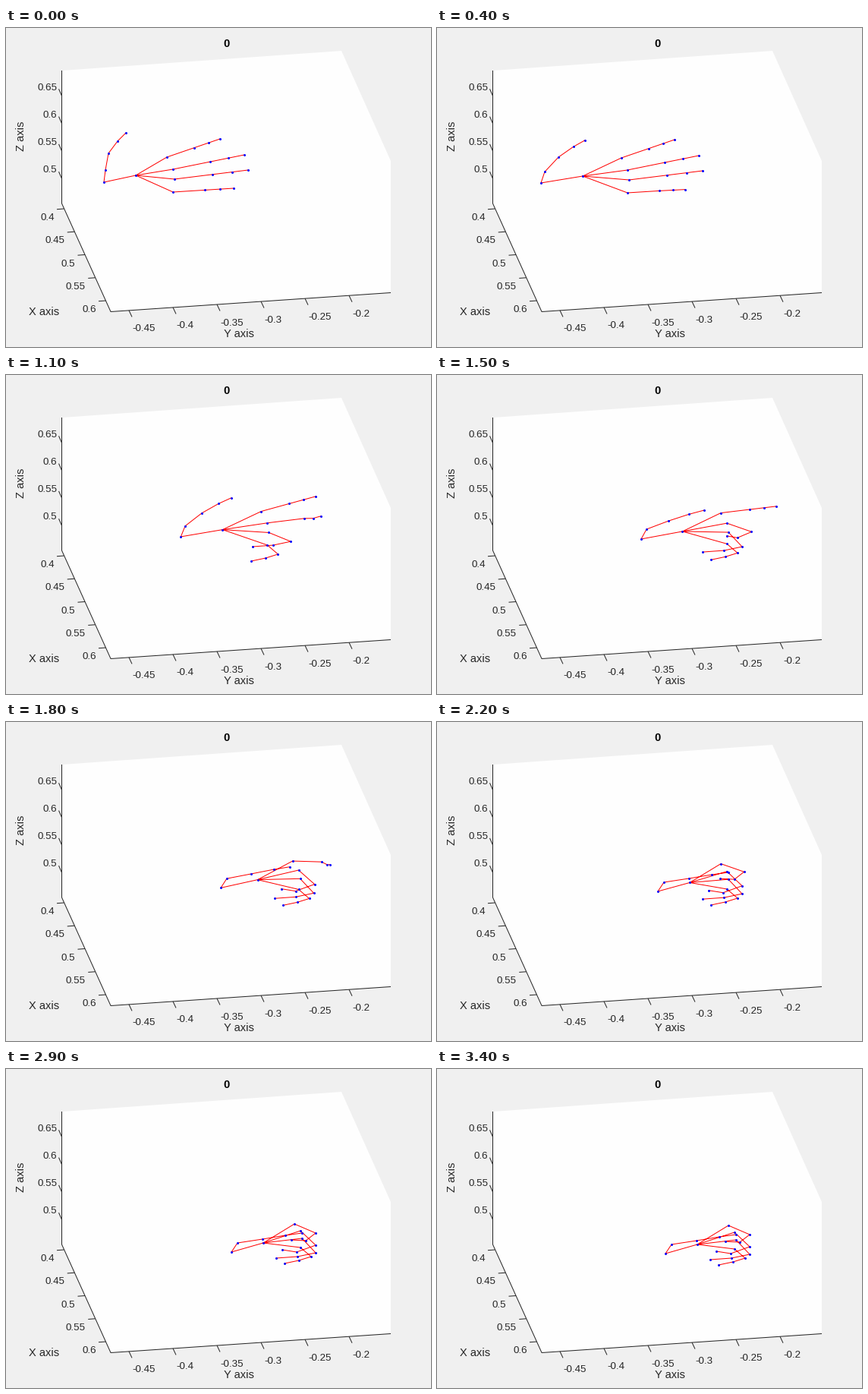
A matplotlib script for the animation above (3500 ms loop, 560 px wide and 420 px high).

```python
import numpy as np
import matplotlib.pyplot as plt
from matplotlib.animation import FuncAnimation

W, H, DPI = 560, 420, 100
FRAMES, STEP = 35, 100
PX = 72 / DPI
INK = "#262626"

plt.rcParams["font.family"] = "Liberation Sans"

# Points are complex numbers, x + y*1j, in pixels with y pointing down.
TIMES = np.array([0, 400, 800, 1500, 2200, 2900, 3400])
WRIST = np.array([129 + 203j, 137 + 204j, 193 + 210j, 269 + 216j,
                  291 + 223j, 297 + 241j, 301 + 243j])
SPEED = np.gradient(WRIST, TIMES)

THUMB_OPEN = np.array([2 - 16j, 6 - 38j, 18 - 54j, 29 - 65j])
THUMB_SHUT = np.array([8 - 12j, 41 - 17j, 71 - 22j, 93 - 25j])

# Knuckle from the wrist, its shift while open, straight reach,
# folded bones, curl start and end in ms.
FINGERS = [
    (83 - 37j, 4j, 70 - 24j, (28 + 12j, -13 + 10j, -19 - 1j), 1500, 2250),
    (91 - 28j, 11j, 94 - 19j, (20 + 19j, -25 + 9j, -19 - 3j), 800, 1700),
    (93 - 18j, 14j, 97 - 12j, (18 + 19j, -24 + 5j, -28 + 2j), 500, 1150),
    (91 - 6j, 19j, 80 - 5j, (14 + 12j, -16 + 5j, -19 + 4j), 330, 830),
]
BONES = np.array([0.52, 0.26, 0.22])   # share of the reach per bone
LAG = np.array([200, 0, 0])            # the first bone folds last


def ease(t, start, end):
    s = np.clip((t - start) / (end - start), 0, 1)
    return s * s * (3 - 2 * s)


def wrist_at(t):
    """Cubic path through the wrist's key points."""
    i = min(np.searchsorted(TIMES, t, side="right") - 1, len(TIMES) - 2)
    h = TIMES[i + 1] - TIMES[i]
    s = (t - TIMES[i]) / h
    return (WRIST[i] * (1 + 2 * s) * (1 - s) ** 2
            + SPEED[i] * h * s * (1 - s) ** 2
            + WRIST[i + 1] * s * s * (3 - 2 * s)
            + SPEED[i + 1] * h * s * s * (s - 1))


def pose(t):
    """Wrist, palm, thumb joints and the joints of each finger."""
    wrist = wrist_at(t)
    stretch = ease(t, 0, 400) - ease(t, 1400, 2200)
    grip = ease(t, 700, 2700)
    palm = wrist + 42 + 13 * stretch - (9 + 3 * grip) * 1j

    swing = 0.43 * ease(t, 0, 400) + 0.57 * ease(t, 700, 2000)
    thumb = wrist + THUMB_OPEN * (THUMB_SHUT / THUMB_OPEN) ** swing

    fingers = []
    for knuckle, shift, reach, folded, start, end in FINGERS:
        base = wrist + knuckle + 23 * stretch + shift * (1 - grip)
        straight = reach * np.exp(0.6j * grip) * BONES
        curl = ease(t, start + LAG, end + LAG)
        bones = straight + (np.array(folded) - straight) * curl
        fingers.append(base + np.cumsum([0, *bones]))
    return wrist, palm, thumb, fingers


fig = plt.figure(figsize=(W / DPI, H / DPI), dpi=DPI, facecolor="#f0f0f0")
ax = fig.add_axes([0, 0, 1, 1])
ax.set_xlim(0, W)
ax.set_ylim(H, 0)
ax.axis("off")


def stroke(*pts):
    ax.plot(*zip(*pts), color=INK, lw=PX, solid_capstyle="butt")


def label(x, y, s, size=13.33, color=INK, **kw):
    """Text with its capitals centred on y."""
    kw = {"ha": "center", **kw}
    ax.text(x, y + 0.36 * size, s, size=size * PX, color=color,
            va="baseline", **kw)


# Box and axes
ax.fill([73.5, 442, 507, 507, 138, 73.5], [56, 30, 175, 348, 373.5, 231],
        color="#fefefe", lw=0)
stroke((73.5, 56), (73.5, 231), (138, 373.5), (507, 348.5))

for i, s in enumerate(("0.65", "0.6", "0.55", "0.5")):
    y = 89.3 + 36.3 * i
    stroke((73.5, y), (69.5, y - 9))
    label(67.3, y - 12.5, s, ha="right")

for i, s in enumerate(("0.4", "0.45", "0.5", "0.55", "0.6")):
    x, y = 76.5 + 13.75 * i, 238 + 30.25 * i
    stroke((x, y), (x - 9.5, y + 0.7))
    label(x - 12.7, y + 10.3, s, ha="right")

for i, s in enumerate(("-0.45", "-0.4", "-0.35", "-0.3", "-0.25", "-0.2")):
    x = 162 + 58 * i
    y = 373.5 - 25 / 369 * (x - 138)
    stroke((x, y), (x + 4, y + 8.5))
    label(x + 4.8, y + 22.7, s, ha="left")

label(50, 372.5, "X axis", 14.67)
label(306.5, 402, "Y axis", 14.67)
ax.text(24.5, 142.5, "Z axis", size=14.67 * PX, color=INK, rotation=90,
        rotation_mode="anchor", ha="center", va="baseline")
label(290.5, 19.5, "0", 14.67, "black", weight="bold")

lines, = ax.plot([], [], color="red", lw=PX)
dots, = ax.plot([], [], "o", color="blue", ms=3 * PX, mew=0)


def draw(frame):
    wrist, palm, thumb, fingers = pose(frame * STEP)
    path = [*thumb[::-1], wrist, palm]
    for joints in fingers:
        path += [np.nan, palm, *joints]
    path = np.array(path)
    lines.set_data(path.real, np.where(np.isnan(path), np.nan, path.imag))
    joints = np.concatenate([[wrist, palm], thumb, *fingers])
    dots.set_data(joints.real, joints.imag)
    return lines, dots


anim = FuncAnimation(fig, draw, frames=FRAMES, interval=STEP, repeat=True,
                     repeat_delay=0)
plt.show()
```
